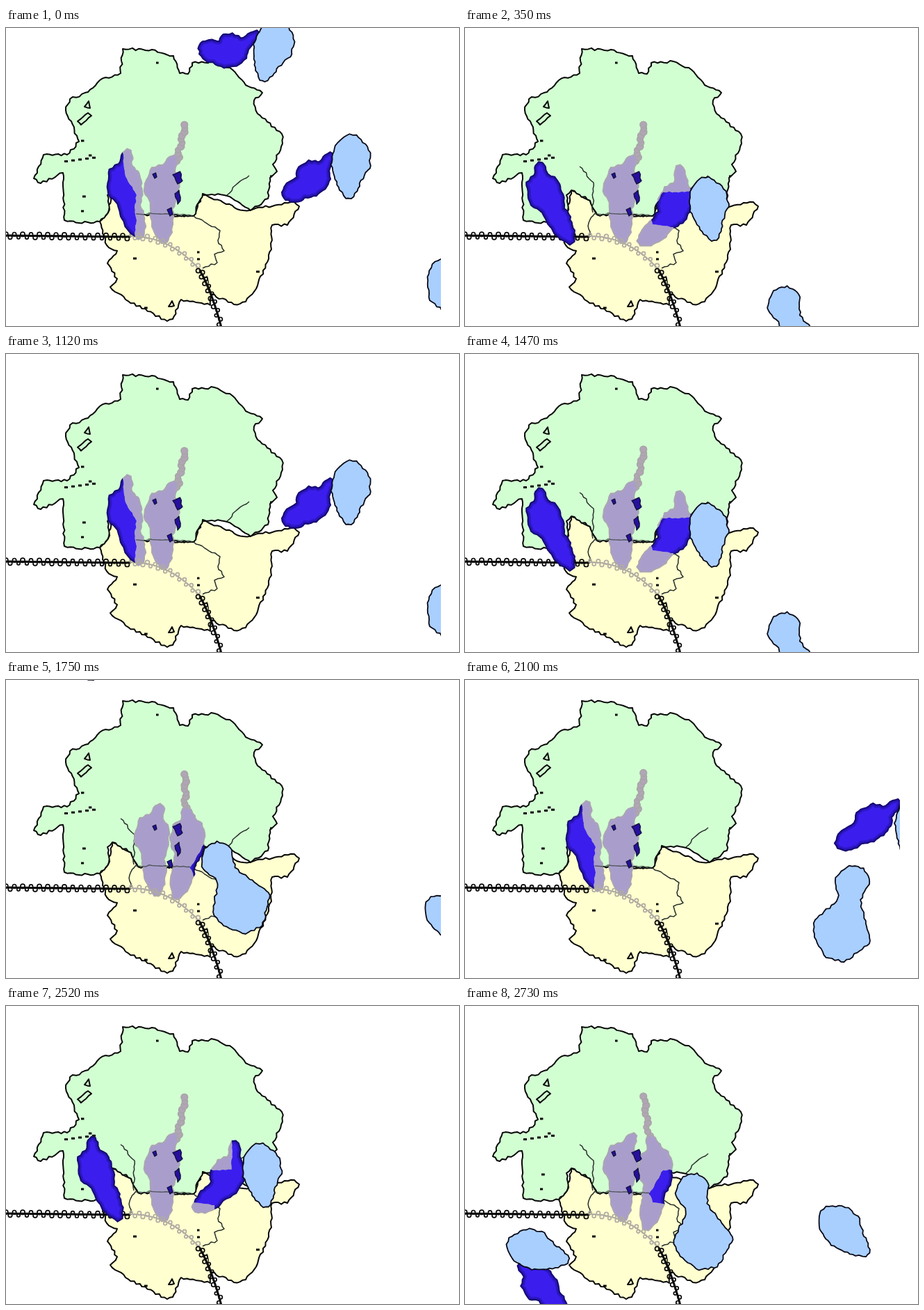
Animation of 652 by 428 pixels, one loop 2800 ms. Source, as an HTML page with a canvas:

```html
<!DOCTYPE html>
<html lang="en">
<head>
<meta charset="utf-8">
<title>Translation at the ribosome</title>
<style>
html, body { margin: 0; width: 100%; height: 100%; overflow: hidden; background: #fff; }
canvas { display: block; }
</style>
</head>
<body>
<canvas id="stage" width="652" height="428"></canvas>
<script>
const ctx = document.getElementById('stage').getContext('2d');
const STEP = 70, STEPS = 40, CYCLE = 16, EDGE = 626;

const hash = n => { const v = Math.sin(n * 127.1 + 11.7) * 43758.5453; return v - Math.floor(v) - 0.5; };
const pairs = text => text.trim().split(/\s+/).map(p => p.split(',').map(Number));

// Breaks each edge into short pieces and nudges them sideways for a molecular outline.
function rough(points, amp = 3, closed = true, seed = 0) {
  const path = new Path2D();
  const last = closed ? points.length : points.length - 1;
  path.moveTo(...points[0]);
  let k = seed;
  for (let i = 0; i < last; i++) {
    const [ax, ay] = points[i], [bx, by] = points[(i + 1) % points.length];
    const len = Math.hypot(bx - ax, by - ay) || 1, n = Math.max(1, Math.round(len / 4.5));
    for (let j = 1; j <= n; j++) {
      const d = j === n ? 0 : hash(++k) * amp, u = j / n;
      path.lineTo(ax + (bx - ax) * u - (by - ay) / len * d, ay + (by - ay) * u + (bx - ax) / len * d);
    }
  }
  if (closed) path.closePath();
  return path;
}

const large = rough(pairs(`168,30 210,31 241,40 250,65 262,66 268,50 300,48 326,60 345,82 369,93
  357,104 362,123 397,152 398,166 384,196 390,206 380,215 377,245 352,262 318,241 283,238 270,270
  190,268 180,248 153,233 146,240 148,262 135,278 105,280 84,276 82,208 50,223 40,216 54,182
  88,182 105,163 86,118 92,102 118,92 135,75 165,65`), 3.5);
const small = rough(pairs(`153,233 180,247 190,268 270,270 283,240 342,262 415,250 422,256 405,283
  383,283 382,318 362,370 345,393 328,397 295,382 294,398 252,390 240,418 232,421 172,390 150,372
  160,360 146,338 160,320 145,312 135,278 147,265`), 3.5, true, 500);
const folds = ['270,270 308,291 305,305 314,320 300,325 304,337 283,345', '187,266 178,280 180,297',
  '318,240 330,226 350,212', '165,199 185,222 184,265', '289,356 295,384'
].map((s, i) => rough(pairs(s), 3, false, 900 + i * 40));
const specks = pairs('110,162 121,183 110,263 382,213 185,331 277,322 277,332 201,402 362,350 218,50 112,242');
const marks = ['113,113 119,105 121,115', '103,134 118,122 123,126 108,139', '234,400 239,392 242,399'].map(s => rough(pairs(s), 1));

const diamond = (x, y, w, h) => rough([[x - w, y - h / 2], [x + w / 2, y - h], [x + w, y + h / 2], [x, y + h]], 2);
const holes = [diamond(214, 212, 3, 4), diamond(247, 215, 7, 9), diamond(247, 243, 4, 10), diamond(236, 264, 4, 6)];

// Inside this zone the strands show through the ribosome; elsewhere they are solid.
const zone = rough(pairs(`166,160 325,160 325,235 285,236 265,270 270,282 300,286 300,340
  180,340 188,276 185,258 188,240 172,213`), 2);
const outside = new Path2D();
outside.rect(0, 0, EDGE, 428);
outside.addPath(zone);

// Outline of a body given by the top, middle and bottom of its spine and the half-widths along it.
function spinePath([ax, ay, mx, my, bx, by], widths, seed = 0) {
  const cx = 2 * mx - (ax + bx) / 2, cy = 2 * my - (ay + by) / 2, left = [], right = [];
  widths.forEach((w, i) => {
    const t = i / (widths.length - 1), s = 1 - t;
    const x = s * s * ax + 2 * s * t * cx + t * t * bx, y = s * s * ay + 2 * s * t * cy + t * t * by;
    const dx = s * (cx - ax) + t * (bx - cx), dy = s * (cy - ay) + t * (by - cy), len = Math.hypot(dx, dy) || 1;
    const l = w + hash(i + seed) * 5, r = w + hash(i + 40 + seed) * 5;
    left.push([x - dy / len * l, y + dx / len * l]);
    right.unshift([x + dy / len * r, y - dx / len * r]);
  });
  return rough([...left, ...right], 3, true, 20 + seed);
}
const strandWidths = [3, 7, 8, 12, 20, 24, 25, 24, 21, 17, 14, 15, 15, 11, 4];
const strandPath = pose => spinePath(pose, strandWidths);
const capPath = spinePath([5, -46, 0, 0, -3, 46], [6, 19, 25, 28, 27, 24, 17, 11, 4], 70);
const motorPath = spinePath([-3, -22, 10, 35, 25, 112], [10, 21, 24, 21, 17, 21, 31, 39, 41, 31, 12], 140);

// Keys: time, then top, middle and bottom of the strand.
const bound = [246, 185, 225, 232, 230, 308], leaving = [178, 175, 172, 230, 196, 301];
const strandKeys = [
  [0, 470, 180, 438, 219, 399, 242],
  [1, 392, 183, 366, 224, 331, 243],
  [5, 308, 197, 301, 257, 251, 311],
  [7, 265, 187, 275, 238, 262, 322],
  [9, 258, 183, 262, 232, 246, 315],
  [10, 251, 187, 247, 232, 238, 311],
  [14, ...bound],
  [23, ...bound],
  [25, 225, 180, 211, 228, 220, 309],
  [26, 202, 175, 188, 228, 208, 304],
  [30, ...leaving],
  [33, ...leaving],
  [37, 110, 193, 117, 240, 156, 308],
  [39, -80, 200, -70, 250, -30, 318]
];
// Keys: time, centre, turn in degrees.
const capKeys = [[0, 495, 199, 0], [1, 420, 193, -3], [5, 351, 260, -12], [7, 547, 325, -48], [9, 643, 345, -55]];
const motorKeys = [[5, 457, 396, -5], [7, 325, 265, 0], [9, 302, 258, -16], [10, 292, 256, -24], [16, 687, 306, 48]];

function at(keys, t, from, to) {
  if (t < from || t > to) return null;
  let i = 0;
  while (i < keys.length - 2 && t > keys[i + 1][0]) i++;
  const a = keys[i], b = keys[i + 1], u = (t - a[0]) / (b[0] - a[0]);
  return a.slice(1).map((v, j) => v + (b[j + 1] - v) * u);
}
const strandAt = age => at(strandKeys, age, -2, 39);

function paint(path, fill, stroke = '#080808', width = 2) {
  ctx.fillStyle = fill;
  ctx.fill(path);
  ctx.strokeStyle = stroke;
  ctx.lineWidth = width;
  ctx.stroke(path);
}

function clipped(path, rule, draw) {
  ctx.save();
  ctx.clip(path, rule);
  draw();
  ctx.restore();
}

function solid(path) {
  paint(path, '#3b1eed', '#160b70', 1.8);
  clipped(path, 'nonzero', () => {
    ctx.strokeStyle = 'rgba(18,8,110,.3)';
    for (const width of [5, 9]) {
      ctx.lineWidth = width;
      ctx.stroke(path);
    }
  });
}

function floating(path, [x, y, turn]) {
  ctx.save();
  ctx.translate(x, y);
  ctx.rotate(turn * Math.PI / 180);
  paint(path, '#a9cfff', '#0a0a18', 1.8);
  ctx.restore();
}

function ring(x, y, r, fill) {
  ctx.beginPath();
  ctx.arc(x, y, r, 0, 7);
  if (fill) ctx.fill();
  ctx.stroke();
}

function quad(t, ax, ay, cx, cy, bx, by) {
  const s = 1 - t;
  return [s * s * ax + 2 * s * t * cx + t * t * bx, s * s * ay + 2 * s * t * cy + t * t * by];
}
function threadPoint(d) {
  if (d < 180) return [d, 298 + d / 90];
  if (d < 292) return quad((d - 180) / 112, 180, 299, 235, 299, 278, 346);
  return quad((d - 292) / 90, 278, 346, 296, 378, 310, 430);
}

function drawThread() {
  for (let i = 0; i < 64; i++) {
    const d = i * 6, inner = d >= 180 && d < 292;
    const [x, y] = threadPoint(d), [nx, ny] = threadPoint(d + 6);
    ctx.strokeStyle = inner ? '#b0aba2' : '#080808';
    ctx.lineWidth = inner ? 1.8 : 3;
    ctx.beginPath();
    ctx.moveTo(x, y);
    ctx.lineTo(nx, ny);
    ctx.stroke();
    ctx.lineWidth = 1.7;
    const side = i % 2 ? 2.5 : -2, len = Math.hypot(nx - x, ny - y) || 1;
    ring(x - (ny - y) / len * side, y + (nx - x) / len * side, 2.6 + hash(i));
  }
}

function drawChain([x, y], tipY) {
  const n = 10;
  ctx.fillStyle = '#b0a6b4';
  ctx.strokeStyle = '#a7a4a6';
  ctx.lineWidth = 1.5;
  for (let i = 0; i <= n; i++) {
    const u = i / n;
    ring(x + (258 - x) * u + Math.sin(i * 1.7) * 2.6 * (1 - u * 0.5), y + 6 + (tipY - y - 6) * u, 4.4 + hash(i) * 1.2, true);
  }
}

function drawRibosome() {
  paint(small, '#ffffcf');
  paint(large, '#d2ffd2');
  ctx.strokeStyle = '#26302a';
  ctx.lineWidth = 1.5;
  folds.forEach(p => ctx.stroke(p));
  ctx.fillStyle = '#080808';
  specks.forEach(([x, y], i) => ctx.fillRect(x - 2, y - 1.5, 4 + hash(i) * 2, 3));
  for (let i = 0; i < 5; i++) ctx.fillRect(84 + i * 10, 190 - i * 1.3, 5, 3);
  ctx.lineWidth = 2;
  ctx.strokeStyle = '#080808';
  marks.forEach(p => ctx.stroke(p));
}

function drawComplex(strand, head, dx, dy) {
  ctx.save();
  ctx.translate(dx, dy);
  solid(strandPath(strand));
  floating(capPath, head);
  ctx.restore();
}

// Other complexes that drift past the edges of the view.
function drawPassers(n) {
  if (n < 3) drawComplex([364, 6, 318, 34, 279, 24], [382, 32, 14], n * 30, n * -55);
  if (n === 24 || n === 25) floating(capPath, [124, n === 25 ? -46 : -18, 0]);
  if (n > 36) drawComplex([78, 370, 110, 402, 143, 448], [105, 353, -76], (n - 39) * 12, (39 - n) * 62);
}

const seam = rough([[187, 267], [220, 267], [268, 270]], 4, false, 31);

function draw(n) {
  const phase = n % CYCLE;
  const ages = [phase + 32, phase + 16, phase, phase - 16];
  const strands = ages.map(strandAt).filter(Boolean).map(strandPath);

  ctx.fillStyle = '#fff';
  ctx.fillRect(0, 0, 652, 428);
  ctx.save();
  ctx.beginPath();
  ctx.rect(0, 0, EDGE, 428);
  ctx.clip();
  ctx.lineJoin = 'round';

  drawRibosome();
  drawChain(strandAt(phase < 7 ? phase + 16 : phase), n > 16 ? 139 - (n - 16) * 0.4 : 139);
  clipped(zone, 'nonzero', () => strands.forEach(p => paint(p, '#a99ecb', '#aaa5b2', 2)));
  ctx.strokeStyle = 'rgba(55,65,60,.75)';
  ctx.lineWidth = 1.5;
  ctx.stroke(seam);
  holes.forEach(p => paint(p, '#27109c', '#10103a', 1.3));
  drawThread();
  clipped(outside, 'evenodd', () => strands.forEach(solid));
  for (const age of ages) {
    const motor = at(motorKeys, age, 4, 17), cap = at(capKeys, age, -2, 11);
    if (motor) floating(motorPath, motor);
    if (cap) floating(capPath, cap);
  }
  drawPassers(n);
  ctx.restore();
}

function tick() {
  draw(Math.floor(performance.now() / STEP) % STEPS);
  requestAnimationFrame(tick);
}
tick();
</script>
</body>
</html>
```
